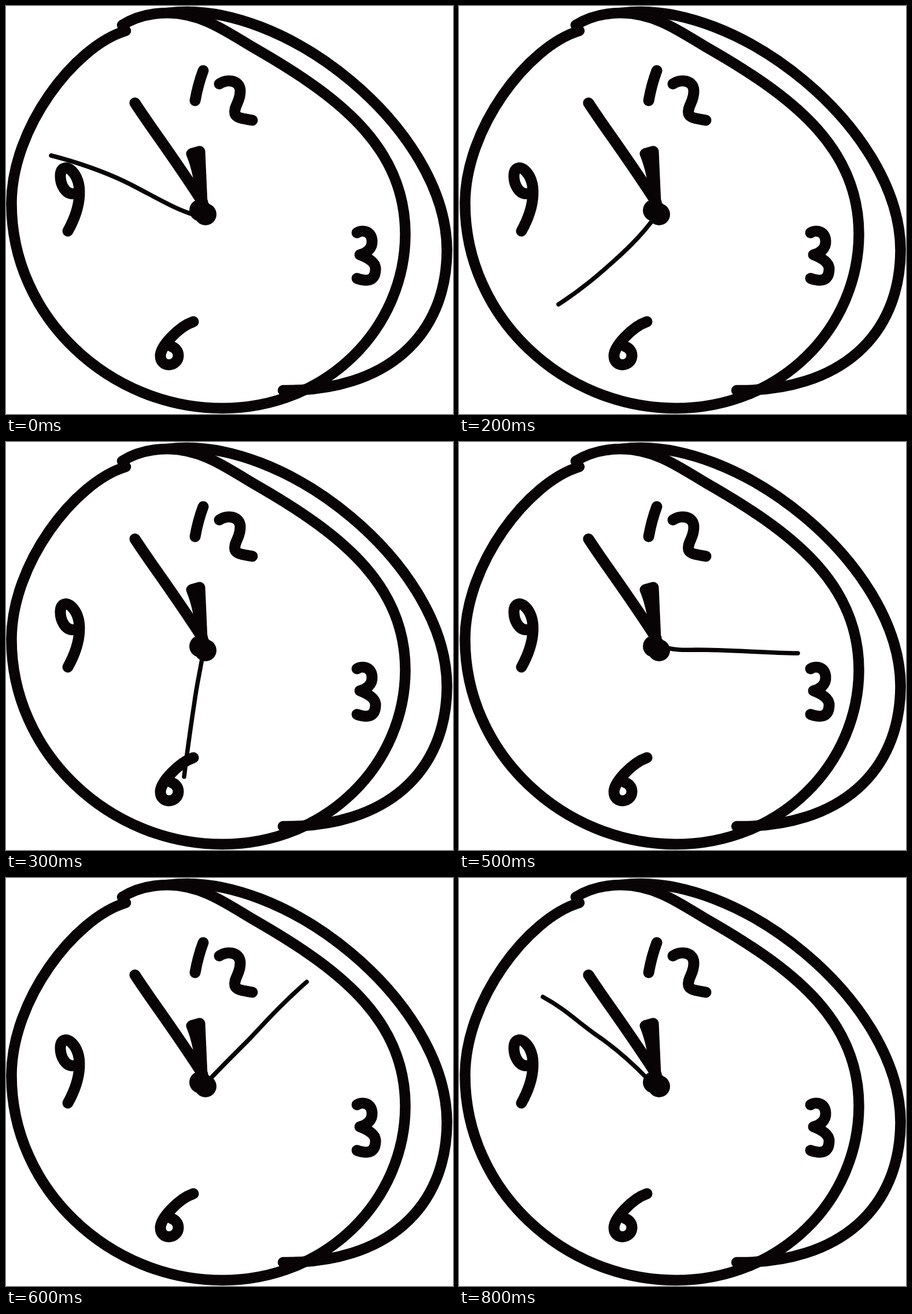
Write an HTML page that moves like this. It is 773x707 px and loops after 0.9 s.

```html
<!DOCTYPE html>
<html lang="en">
<head>
<meta charset="utf-8">
<title>Clock</title>
<style>
  html, body { margin: 0; width: 100%; height: 100%; overflow: hidden; background: #fff; }
  svg { display: block; width: 773px; height: 707px; }
  path { fill: none; stroke: #080405; stroke-width: 19; stroke-linecap: round; stroke-linejoin: round; }
  circle, .solid { fill: #080405; }
  .rim { stroke-width: 18.5; }
  #second { stroke-width: 7.5; }
</style>
</head>
<body>
<svg viewBox="0 0 773 707">
  <g id="clock">
    <!-- face and rim -->
    <path class="rim" d="M207 43C118 70 10 212 9.5 341C9 540 180 697 374 697C555 697 690 558 690.5 395C690 252 588 165 440 79C388 50 345 13 280 12C250 12 225 18 201 33"/>
    <path class="rim" d="M280 12C481 -14 762 215 762.5 423C762 571 659 668 479 666"/>
    <!-- numerals -->
    <path d="M341 112Q332 136 327 164"/>
    <path d="M369 135C382 126 404 128 405 146C406 166 393 174 396 187C399 195 412 195 426 198"/>
    <path d="M607 393C614 388 632 388 633 407C634 421 622 429 612 431C630 438 640 446 639 457C638 477 624 478 607 472"/>
    <path d="M324 547C298 556 267 590 267 606C267 628 297 626 298 606C298 597 292 592 286 590"/>
    <path d="M119 325C102 328 94 308 94 295C94 278 106 278 113 285C133 304 132 345 107 390"/>
    <!-- hands -->
    <path d="M223 168C250 210 285 255 340 340"/>
    <path class="solid" d="M321 256L335 252L339 342Q335 290 321 256Z"/>
    <path id="second"/>
    <circle cx="336" cy="354" r="19"/>
    <circle cx="345" cy="361" r="19"/>
  </g>
</svg>
<script>
  const STEP_MS = 100;
  // Hand-drawn second hand, tip to centre, one stroke per tick.
  const strokes = [
    'M78 259C120 270 165 285 205 304C250 326 290 352 326 362',
    'M88 409C150 402 200 392 245 383C280 376 305 368 328 362',
    'M171 517C210 492 240 466 269 440C299 413 319 392 336 368',
    'M308 580C314 530 320 490 326 450C330 420 336 395 340 370',
    'M448 545C415 500 400 475 390 450C378 418 368 393 355 372',
    'M585 366C520 365 470 360 409 360C384 361 374 360 359 357',
    'M520 180C480 215 450 248 420 280C395 305 375 325 353 348',
    'M337 97C336 160 340 240 341 345',
    'M144 206C185 228 210 255 245 278C280 303 303 325 325 348'
  ];
  const clock = document.getElementById('clock');
  const second = document.getElementById('second');

  function draw(now) {
    const tick = Math.floor(now / STEP_MS) % strokes.length;
    second.setAttribute('d', strokes[tick]);
    // The whole drawing jitters one pixel on every third tick.
    clock.setAttribute('transform', `translate(${tick % 3 === 2 ? 1 : 0} 0)`);
  }

  const start = performance.now();
  function loop() {
    draw(performance.now() - start);
    requestAnimationFrame(loop);
  }
  loop();
</script>
</body>
</html>
```
